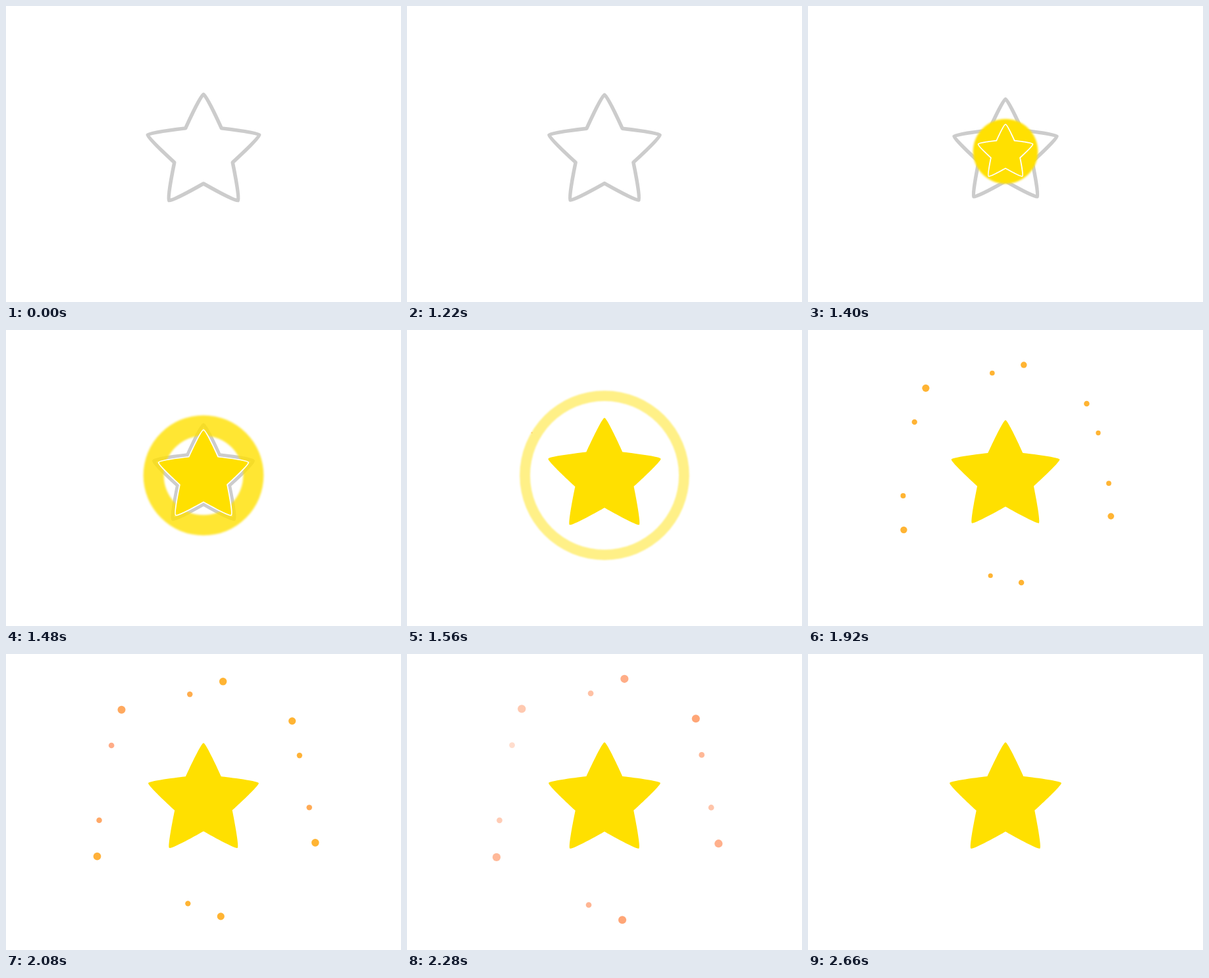
Write an HTML page with a canvas that moves like this. It is 600 by 450 pixels and loops after 3620 ms.

```html
<!DOCTYPE html>
<html lang="en">
<head>
<meta charset="utf-8">
<title>Star burst</title>
<style>
  html, body { margin: 0; width: 100%; height: 100%; overflow: hidden; background: #fff; }
  canvas { display: block; }
</style>
</head>
<body>
<canvas id="stage" width="600" height="450"></canvas>
<script>
const ctx = document.getElementById('stage').getContext('2d');
const LOOP = 3620;
const STEP = 20;
const YELLOW = '#ffe000';
const CENTER = { x: 300, y: 221 };
const RING_RADIUS = 150.4;
const STAR = { x: 300, y: 223.5, outer: 89.2, inner: 46.5, round: 4 };

// Angle in degrees clockwise from the top, start time in ms.
const SMALL_DOTS = [[300.4, 1517], [258.7, 1585], [94.4, 1620], [-7.4, 1632], [65.4, 1670], [188.5, 1682]];
const LARGE_DOTS = [[317.6, 1600], [241.8, 1664], [111.2, 1702], [9.4, 1716], [48.5, 1756], [171.6, 1756]];

const clamp = v => Math.min(1, Math.max(0, v));
const mix = (a, b, p) => a + (b - a) * p;
const progress = (t, from, to) => clamp((t - from) / (to - from));
const smooth = (t, from, to) => {
  const p = progress(t, from, to);
  return p * p * (3 - 2 * p);
};

function starPath(scale) {
  const { outer, inner, round } = STAR;
  const path = new Path2D();
  const point = (radius, angle, along = 0) => [
    STAR.x + scale * (radius * Math.sin(angle) + along * Math.cos(angle)),
    STAR.y + scale * (along * Math.sin(angle) - radius * Math.cos(angle))
  ];
  const half = Math.PI / 5;
  path.moveTo(...point(inner, -half));
  for (let i = 0; i < 5; i++) {
    const tip = i * 2 * half;
    const before = point(inner, tip - half);
    const after = point(inner, tip + half);
    path.bezierCurveTo(...before, ...point(outer, tip, -round), ...point(outer, tip));
    path.bezierCurveTo(...point(outer, tip, round), ...after, ...after);
  }
  path.closePath();
  return path;
}

function drawOutline(t) {
  if (t >= 1600) return;
  ctx.strokeStyle = '#ccc';
  ctx.lineWidth = 5.5;
  ctx.lineJoin = 'round';
  ctx.stroke(starPath(1 - 0.0004 * Math.max(0, t - 1200)));
}

function drawRing(t) {
  const outer = RING_RADIUS * smooth(t, 1238, 1661);
  const inner = RING_RADIUS * smooth(t, 1336, 1668);
  if (outer - inner < 0.1) return;
  ctx.save();
  ctx.globalAlpha = 1 - smooth(t, 1382, 1724);
  ctx.filter = `blur(${mix(0.4, 1.5, clamp((RING_RADIUS - outer) / 59))}px)`;
  ctx.fillStyle = YELLOW;
  ctx.beginPath();
  ctx.arc(CENTER.x, CENTER.y, outer, 0, 2 * Math.PI);
  ctx.arc(CENTER.x, CENTER.y, inner, 0, 2 * Math.PI, true);
  ctx.fill();
  ctx.restore();
}

function starScale(t) {
  if (t < 1600) return 1.04 * smooth(t, 1220, 1600);
  if (t < 1910) return mix(1.04, 0.97, smooth(t, 1600, 1910));
  return mix(0.97, 1, smooth(t, 1910, 2200));
}

function drawStar(t) {
  const scale = starScale(t);
  if (scale <= 0) return;
  const path = starPath(scale);
  ctx.strokeStyle = '#fff';
  ctx.lineWidth = 3.5;
  ctx.stroke(path);
  ctx.fillStyle = YELLOW;
  ctx.fill(path);
}

function drawDots(t, dots, reach, size) {
  for (const [degrees, start] of dots) {
    const age = t - start;
    if (age <= 0 || age >= 905) continue;
    const p = 1 - Math.exp(-age / 141);
    const angle = degrees * Math.PI / 180;
    const distance = mix(115.5, reach, p);
    const tint = progress(age, 400, 540);
    const alpha = 0.95 * clamp(age / 90) * clamp((905 - age) / 500);
    ctx.fillStyle = `rgba(255, ${mix(176, 128, tint)}, ${mix(40, 70, tint)}, ${alpha})`;
    ctx.beginPath();
    ctx.arc(CENTER.x + distance * Math.sin(angle), CENTER.y - distance * Math.cos(angle),
      size * p, 0, 2 * Math.PI);
    ctx.fill();
  }
}

function render(now) {
  const t = Math.floor((now % LOOP) / STEP) * STEP;
  ctx.fillStyle = '#fff';
  ctx.fillRect(0, 0, 600, 450);
  drawOutline(t);
  drawRing(t);
  drawStar(t);
  drawDots(t, SMALL_DOTS, 163, 4.4);
  drawDots(t, LARGE_DOTS, 187, 6.2);
}

const begin = performance.now();
function loop() {
  render(performance.now() - begin);
  requestAnimationFrame(loop);
}
loop();
</script>
</body>
</html>
```
